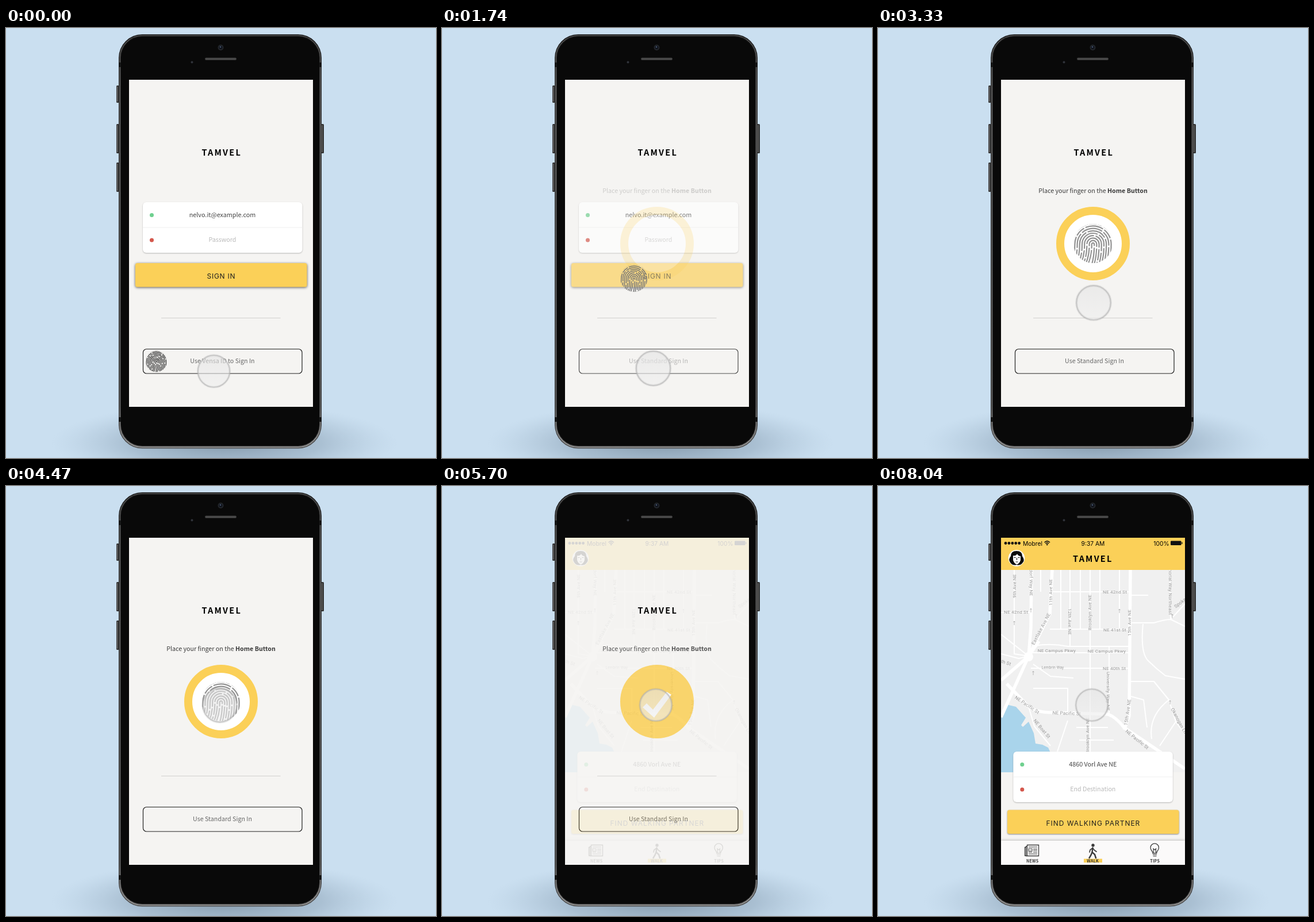
Animation of 748 by 748 pixels, one loop 8100 ms. Source, as an HTML page:

```html
<!DOCTYPE html>
<html lang="en">
<head>
<meta charset="utf-8">
<title>Walking app sign in</title>
<style>
html, body { margin: 0; width: 100%; height: 100%; overflow: hidden; background: #cadff0; }
svg { display: block; width: 100vw; height: 100vh; }
text { font-family: "Noto Sans CJK SC", "Noto Sans CJK JP", "Noto Sans", sans-serif; text-anchor: middle; }
.ui { font-family: Inter, Roboto, sans-serif; }
.start { text-anchor: start; }
.streets text { font-family: Roboto, "Liberation Sans", sans-serif; letter-spacing: .2px; fill: #989898; }
.card { filter: drop-shadow(0 1px 1.3px rgba(0,0,0,.25)); }
.raised { filter: drop-shadow(0 1px 2.2px rgba(0,0,0,.65)); }
.flat { filter: drop-shadow(0 1px 1.3px rgba(0,0,0,.45)); }
</style>
</head>
<body>
<svg id="stage" viewBox="0 0 748 748" xmlns="http://www.w3.org/2000/svg"></svg>
<script>
const LOOP = 8100;
const YELLOW = '#fbd058';
const PAPER = '#f5f4f2';

const label = (x, y, str, size, attrs = '') =>
  `<text x="${x}" y="${y}" font-size="${size}" ${attrs}>${str}</text>`;
const rect = (x, y, w, h, fill, attrs = '') =>
  `<rect x="${x}" y="${y}" width="${w}" height="${h}" fill="${fill}" ${attrs}/>`;
const dot = (x, y, r, fill, attrs = '') =>
  `<circle cx="${x}" cy="${y}" r="${r}" fill="${fill}" ${attrs}/>`;
const line = (d, width, color = '#fff', attrs = '') =>
  `<path d="${d}" fill="none" stroke="${color}" stroke-width="${width}" ${attrs}/>`;

function card(x, y, filled, hint) {
  return `<g class="card">${rect(x, y, 277.5, 88, '#fff', 'rx="6"')}</g>` +
    rect(x, y + 43.5, 277.5, 1, '#f0f0f0') +
    dot(x + 15.5, y + 22.5, 3.5, '#6fd08f') + dot(x + 15.5, y + 66, 3.5, '#d4574c') +
    label(x + 138.5, y + 25.5, filled, 10.8, 'fill="#444"') +
    label(x + 138.5, y + 69, hint, 10.7, 'fill="#b9b9b9"');
}

function button(y, str, spacing, shadow) {
  return `<g class="${shadow}">${rect(225, y, 298.5, 41.5, YELLOW, 'rx="3.5"')}</g>` +
    label(374.4, y + 27, str, 12, `class="ui" fill="#1d1d1d" letter-spacing="${spacing}"`);
}

// Nested arches whose legs drift apart, cut to a disc of radius 34.
function fingerprint() {
  let ridges = '';
  for (let i = 0; i < 10; i++) {
    const r = 2.2 + i * 4.2;
    const gaps = `${26 + (i * 17) % 23} 4.5 ${15 + (i * 11) % 19} 4.5`;
    const d = `M${-r - 7} 37C${-r - 2} 26 ${-r} 16 ${-r} 1A${r} ${r} 0 0 1 ${r} 1C${r} 14 ${r - 1} 26 ${r - 5} 38`;
    ridges += `<path d="${d}" stroke-dasharray="${gaps}" stroke-dashoffset="${i * 13}"/>`;
  }
  return `<g clip-path="url(#disc)" fill="none" stroke-width="2.2" stroke-linecap="round">${ridges}</g>`;
}

function phone() {
  const key = (x, y, h) => rect(x, y, 5, h, '#333', 'rx="1.5"') + rect(x + 1, y + 2, 1.2, h - 4, '#777');
  const bands = [60, 677].map(y =>
    rect(196, y, 4, 8, '#151515') + rect(545, y, 4, 8, '#151515')).join('');
  return `<ellipse cx="380" cy="722" rx="302" ry="70" fill="url(#floor)"/>` +
    key(192, 100, 30) + key(192, 167, 51) + key(192, 234, 51) + key(548, 167, 51) +
    rect(196, 11, 353, 720.5, 'url(#rim)', 'rx="41"') +
    rect(198.2, 13.2, 348.6, 716, 'none', 'rx="39" stroke="url(#glint)" stroke-width="1.3"') +
    rect(200, 15, 345, 712, '#090909', 'rx="37"') + bands +
    dot(373.5, 34, 5, '#23262b') + dot(373.5, 34, 3, '#10141c') + dot(373, 33, 1.2, '#4b5c78') +
    rect(346, 51.5, 55, 4.5, '#393939', 'rx="2.2"') + rect(347, 53, 53, 1.5, '#555', 'rx=".7"') +
    dot(323.5, 59.5, 2, '#30333a');
}

function streetMap() {
  const wide = [
    'M267 146L266 245L262 296', 'M303 146L299 222L262 296L214 402', 'M439 146L437 400L428 424',
    'M214 338L262 296L280 270', 'M224 344L260 382Q274 395 310 394L400 397Q414 402 428 420L534 492'
  ];
  const thin = [
    'M237 146V292L262 296', 'M334 146V278', 'M369 146V462', 'M402 278V398', 'M214 220H267',
    'M299 184H439', 'M299 249H439', 'M272 278Q300 273 330 279H439', 'M268 290H439', 'M266 317H439',
    'M283 146V184M318 146V249M352 146V249M386 146V250M420 146V250', 'M214 258L262 296', 'M214 292L245 300L262 296',
    'M270 310L300 331L340 334', 'M270 352H330V392', 'M262 384L272 418L300 452', 'M330 408L312 462',
    'M345 420H400M350 442H410', 'M439 190H470M439 238H480Q500 232 509 232L534 244', 'M508 146L509 232',
    'M461 240Q456 290 470 304T500 330L534 336', 'M439 340H480L506 372L518 410L534 432',
    'M506 372Q470 400 476 440', 'M518 410L490 452', 'M509 232L534 205', 'M440 366L462 372L468 420'
  ];
  const streets = [
    [240, 174, '9th Ave NE', -90], [264, 168, 'dorf Way NE', 90], [303, 185, '11th Ave NE', -90],
    [331, 236, '12th Ave NE', 90], [371, 220, 'Brooklyn Ave NE', -90], [440, 238, '15th Ave NE', -90],
    [412, 187, 'NE 42nd St', 0], [240, 222, 'NE 42nd St', 0], [412, 253, 'NE 41st St', 0],
    [311, 289, 'NE Campus Pkwy', 0], [398, 290, 'NE Campus Pkwy', 0], [411, 320, 'NE 40th St', 0],
    [286, 250, 'Eastlake Ave NE', -62], [222, 310, 'th St', 18], [258, 383, 'NE Pacific St', 34],
    [328, 398, 'NE Pacific St', 2], [283, 424, 'NE Boat St', 50], [398, 357, 'University Way NE', 90],
    [367, 434, 'Brooklyn Ave NE', -90], [437, 394, '15th Ave NE', -82], [449, 443, 'NE Pacific St', 39],
    [506, 183, 'morial Way Northeast', 90], [521, 410, 'Okanogan Ln', 62], [529, 204, 'Spokan', -38]
  ];
  const arrows = [[237, 238], [266, 216], [420, 217], [270, 325], [508, 376], [512, 226]];
  return rect(214, 146, 320, 352, '#f0f0f0') +
    '<path d="M214 404L223 380L240 384L257 403L249 416L252 419L262 410L271 430L274 448L286 450L296 455L301 466V498H214Z" fill="#a9d4eb"/>' +
    line(thin.join(''), 2, '#fff', 'stroke-linejoin="round"') +
    line(wide.join(''), 5.5, '#fff', 'stroke-linejoin="round"') +
    dot(262, 297, 8, '#fff') +
    arrows.map(([x, y]) => line(`M${x} ${y + 4}V${y - 3}m-1.5 2l1.5 -2l1.5 2`, .8, '#aaa')).join('') +
    '<g class="streets">' + streets.map(([x, y, name, turn]) =>
      label(x, y, name, 8.1, `transform="rotate(${turn} ${x} ${y})"`)).join('') +
    label(304, 317.5, 'Lembrin Way', 6.3) + '</g>';
}

function avatar() {
  return dot(241, 125.5, 14.3, '#fff') +
    '<path d="M230 133Q226 128 231 122Q231 113 241 113Q251 113 251 122Q256 129 252 133Q248 139 241 137Q234 139 230 133Z" fill="#0b0b0b"/>' +
    '<path d="M235 121Q240 122 242 118Q244 122 248 122V129Q246 135 241.500 136.500Q237 135 235 129Z" fill="#fff"/>' +
    line('M236.500 124.500h3M243.500 124.500h3M241.500 125v4M239.500 132h4', 1, '#0b0b0b');
}

function statusBar() {
  let out = rect(214, 90, 320, 56, YELLOW);
  for (let i = 0; i < 5; i++) out += dot(222 + i * 5.9, 99.5, 2.4, '#111');
  return out + label(252, 103.6, 'Mobrel', 10.3, 'class="ui start"') +
    line('M289.500 98.200Q294.200 93.500 299 98.200M291.300 100.300Q294.200 97.500 297.200 100.300', 1.5, '#111') +
    dot(294.2, 102, 1.3, '#111') +
    label(374, 103.6, '9:37 AM', 10.3, 'class="ui"') +
    label(493, 103.6, '100%', 10.3, 'class="ui"') +
    rect(509, 95.5, 18.5, 7.5, '#111', 'rx="1.2"') + rect(528.2, 97.5, 1.3, 3.5, '#111');
}

function navBar() {
  const ink = '#3c3c3c';
  const news = line('M259.500 624.500H279.500V643.500H259.500ZM259.500 627H257.500V643.500H261M257.500 628.500H255.500V643H258', 1.3, ink) +
    line('M262 628H277M262 640H277M262 637H268M270 631.500H277M270 634H277M270 637H277', 1.2, ink) +
    rect(262, 631, 6, 4, 'none', `stroke="${ink}"`);
  const walker = dot(374, 625, 2.7, ink) +
    line('M373.500 629.500L372.500 637L377 641L379 647M372.500 637L370.500 642L367.500 647', 2.5, ink, 'stroke-linecap="round"') +
    line('M373 630L369 633L368 637M374 630.500L377 634L380 636', 1.7, ink, 'stroke-linecap="round"');
  const bulb = line('M478 639Q478 636 475.500 633.500A7.200 7.200 0 1 1 487 633.500Q484.500 636 484.500 639Z', 1.3, ink) +
    line('M479.500 638L479 631L481.300 633L483.500 631L483 638M478 641.500H485M478.500 644H484.500', 1.2, ink);
  const tag = 'font-weight="700" letter-spacing=".3" fill="#333"';
  return `<g style="filter:drop-shadow(0 -1px 2px rgba(0,0,0,.22))">${rect(214, 617, 320, 42, '#fbfafa')}</g>` +
    rect(358, 648.5, 32, 6.5, YELLOW) + news + walker + bulb +
    label(268.7, 654.5, 'NEWS', 7, tag) + label(373.7, 654.5, 'WALK', 7, tag) + label(481.7, 654.5, 'TIPS', 7, tag);
}

const stage = document.getElementById('stage');
stage.innerHTML = `
<defs>
  <clipPath id="disc"><circle r="34"/></clipPath>
  <clipPath id="screen"><rect x="214" y="90" width="320" height="569"/></clipPath>
  <radialGradient id="floor">
    <stop offset="0" stop-color="#74899b" stop-opacity=".8"/>
    <stop offset=".55" stop-color="#7c93a8" stop-opacity=".42"/>
    <stop offset=".8" stop-color="#93aabf" stop-opacity=".2"/>
    <stop offset="1" stop-color="#a9c0d4" stop-opacity="0"/>
  </radialGradient>
  <linearGradient id="rim" x2="0" y2="1">
    <stop offset="0" stop-color="#1c1c1c"/><stop offset=".1" stop-color="#2a2a2a"/>
    <stop offset=".9" stop-color="#303030"/><stop offset="1" stop-color="#555"/>
  </linearGradient>
  <linearGradient id="glint" x2="0" y2="1">
    <stop offset="0" stop-color="#555"/><stop offset=".15" stop-color="#6a6a6a"/>
    <stop offset=".9" stop-color="#707070"/><stop offset="1" stop-color="#a5a5a5"/>
  </linearGradient>
  <linearGradient id="glass" x2="0" y2="1">
    <stop offset="0" stop-color="#e4e4e4"/><stop offset="1" stop-color="#efefef"/>
  </linearGradient>
</defs>
${rect(0, 0, 748, 748, '#cadff0')}
${phone()}
<g clip-path="url(#screen)">
  ${rect(214, 90, 320, 570, PAPER)}
  ${rect(270, 504, 207.5, 1, '#d2d1cf')}
  <g id="form">
    ${card(238, 303, 'nelvo.it@example.com', 'Password')}
    ${button(409, 'SIGN IN', .75, 'raised')}
  </g>
  <g id="scan">
    ${label(374, 286.500, 'Place your finger on the <tspan font-weight="700">Home Button</tspan>', 10.7, 'fill="#3b3b3b"')}
    ${dot(374, 375, 57, '#fff', `id="ring" stroke="${YELLOW}"`)}
  </g>
  ${rect(238.5, 558.5, 276.5, 42.5, 'none', 'id="outline" rx="6" stroke="#222" stroke-width="1.2"')}
  ${label(376.5, 583, 'Use Vensa ID to Sign In', 10.7, 'id="useFinger" fill="#686868"')}
  ${label(376.5, 583, 'Use Standard Sign In', 10.7, 'id="useStandard" fill="#686868"')}
  <g id="print">${fingerprint()}</g>
  <path id="check" d="M-25 10L-18 3L-7 14L17 -17L25 -12L-5 28Z" fill="#fff"/>
  <g id="home">
    ${rect(214, 90, 320, 570, PAPER)}
    ${streetMap()}${statusBar()}${avatar()}
    ${card(235.3, 462, '4860 Vorl Ave NE', 'End Destination')}
    ${button(563.5, 'FIND WALKING PARTNER', .95, 'flat')}
    ${navBar()}
  </g>
  <text id="title" font-size="14.500" font-weight="700" letter-spacing="2.200">TAMVEL</text>
  <g id="touch">
    ${dot(0, 0, 28, 'url(#glass)', 'fill-opacity=".6"')}
    ${dot(0, 0, 28, 'none', 'stroke="#999" stroke-opacity=".18" stroke-width="4"')}
    ${dot(0, 0, 28, 'none', 'stroke="#b4b4b4" stroke-opacity=".65" stroke-width="1.6"')}
  </g>
</g>`;

const parts = Object.fromEntries(
  ['form', 'scan', 'ring', 'outline', 'useFinger', 'useStandard', 'print', 'check', 'home', 'title', 'touch']
    .map(id => [id, document.getElementById(id)]));

const clamp = v => Math.min(1, Math.max(0, v));
const part = (t, from, to) => clamp((t - from) / (to - from));
const sine = p => (1 - Math.cos(Math.PI * p)) / 2;
const cubic = p => p < .5 ? 4 * p ** 3 : 1 - 4 * (1 - p) ** 3;
const ease = (t, from, to) => sine(part(t, from, to));
const mix = (a, b, p) => a + (b - a) * p;
const place = (node, x, y, scale) =>
  node.setAttribute('transform', `translate(${x} ${y}) scale(${scale})`);
const fade = (node, value) => {
  node.style.opacity = value;
  node.style.display = value > 0 ? '' : 'none';
};

// Smooth curve through [time, value] keys, at rest at both ends.
function track(t, keys) {
  const last = keys.length - 1;
  if (t <= keys[0][0]) return keys[0][1];
  if (t >= keys[last][0]) return keys[last][1];
  const i = keys.findIndex(k => k[0] > t) - 1;
  const slope = n => n <= 0 || n >= last ? 0 :
    (keys[n + 1][1] - keys[n - 1][1]) / (keys[n + 1][0] - keys[n - 1][0]);
  const [t0, a] = keys[i], [t1, b] = keys[i + 1];
  const d = t1 - t0, p = (t - t0) / d;
  return mix(a, b, p * p * (3 - 2 * p)) +
    d * p * (1 - p) * ((1 - p) * slope(i) - p * slope(i + 1));
}

function render(t) {
  fade(parts.form, 1 - ease(t, 1450, 2200));
  fade(parts.scan, ease(t, 1500, 2280));
  fade(parts.useFinger, 1 - ease(t, 270, 1350));
  fade(parts.useStandard, ease(t, 1350, 2200));
  fade(parts.outline, track(t, [[270, 1], [1080, .62], [1350, .55], [2200, 1]]));

  const x = track(t, [[270, 261.5], [1080, 298.5], [2310, 363], [2750, 374]]);
  const y = t < 2200 ? mix(580, 354, ease(t, 1080, 2200)) : mix(354, 375, ease(t, 2200, 2800));
  const size = mix(37, 68, ease(t, 1080, 2750));
  const ink = Math.round(mix(45, 145, ease(t, 900, 2200)));
  place(parts.print, x, y, size / 68);
  parts.print.setAttribute('stroke', `rgb(${ink},${ink},${ink})`);
  fade(parts.print, 1 - ease(t, 4480, 4780));

  const inner = mix(50, 0, ease(t, 4500, 4950));
  parts.ring.setAttribute('r', (64 + inner) / 2);
  parts.ring.setAttribute('stroke-width', 64 - inner);

  const tick = ease(t, 4780, 5120);
  place(parts.check, 374, 375, mix(.5, 1, tick));
  fade(parts.check, tick);

  fade(parts.home, ease(t, 5550, 6180));
  const rise = cubic(part(t, 5955, 7230));
  parts.title.setAttribute('x', mix(375.2, 373.8, rise));
  parts.title.setAttribute('y', mix(221.6, 131.6, rise));

  const touchX = track(t, [[270, 361.5], [1080, 363], [2310, 371.5], [3330, 375], [4540, 372]]);
  const touchY = t < 1990 ? mix(597, 592, ease(t, 270, 1080)) : mix(592, 381, ease(t, 1990, 4540));
  const radius = track(t, [[270, 27.8], [800, 29.5], [4450, 29.5], [4700, 27.8]]);
  place(parts.touch, touchX, touchY, radius / 28);
}

const start = performance.now();
function tick() {
  render((performance.now() - start) % LOOP);
  requestAnimationFrame(tick);
}
tick();
</script>
</body>
</html>
```
